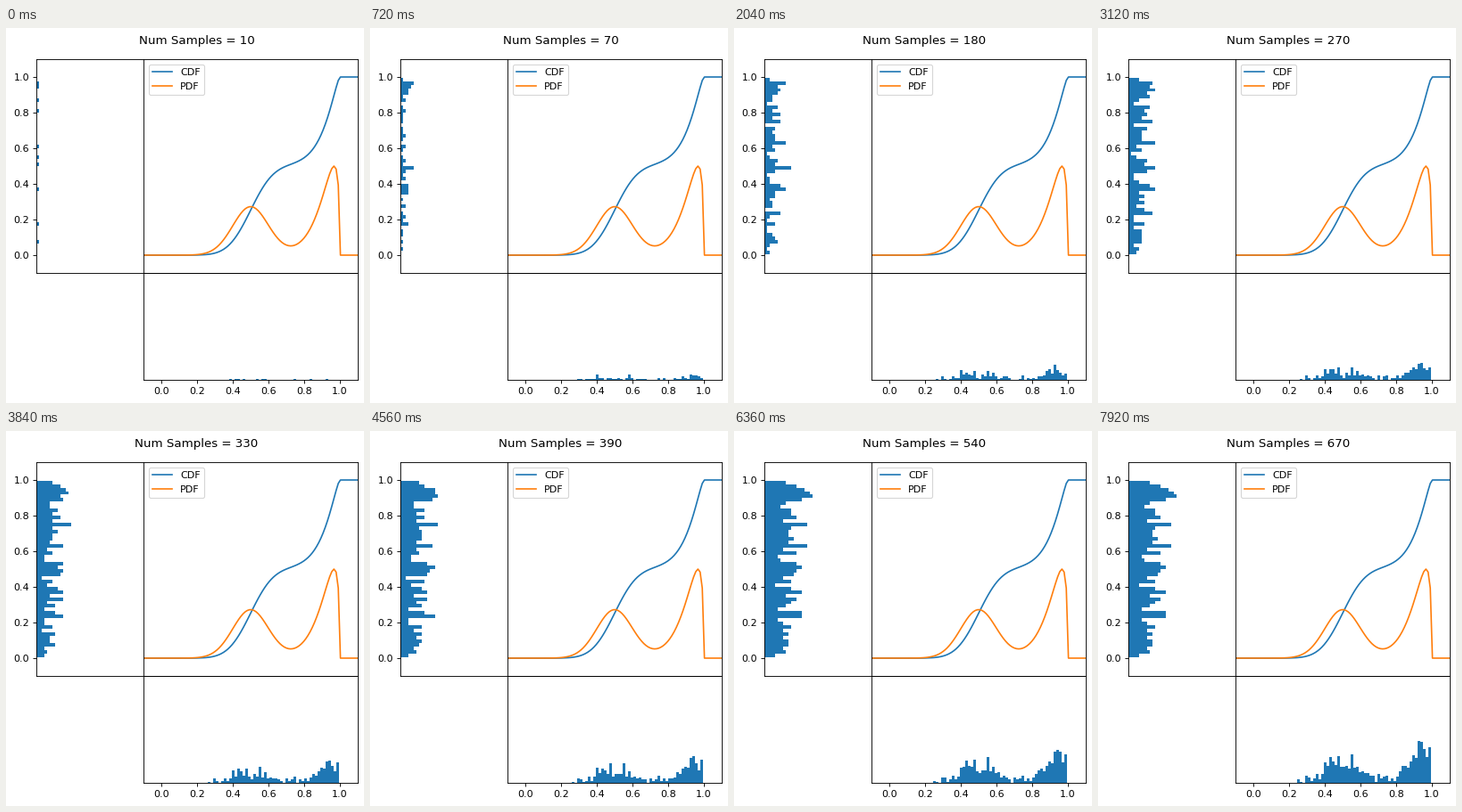
Recreate the animation shown at these times as a matplotlib script. Size 401 by 421 pixels, loop 8 s.

```python
import numpy as np
import matplotlib.pyplot as plt
from matplotlib.animation import FuncAnimation

W, H, DPI = 401, 421, 80
BLUE, ORANGE = "#1f77b4", "#ff7f0e"
TICK_MS, HOLD, LOOP_MS = 40, 3, 8000
BATCH, BINS = 10, 50
MAX_UNIFORM, MAX_MAPPED = 500, 670  # the uniform draws run out first
SPAN = (-0.1, 1.1)


def density(x):
    """Bell around 0.5 plus a skewed spike that falls to zero at 1."""
    bell = 0.272 * np.exp(-0.5 * ((x - 0.5) / 0.1) ** 2)
    rise, fall = 12.9, 0.43
    mode = rise / (rise + fall)
    t = np.clip(x, 0, 1)
    spike = 0.5 * (t / mode) ** rise * ((1 - t) / (1 - mode)) ** fall
    return np.where((x >= 0) & (x <= 1), bell + spike, 0)


def add_axes(x, y, w, h, xlim, ylim):
    """Axes placed by pixel, y measured from the top of the stage."""
    ax = fig.add_axes([x / W, 1 - (y + h) / H, w / W, h / H])
    ax.set(xlim=xlim, ylim=ylim, xticks=[], yticks=[])
    return ax


fine = np.linspace(*SPAN, 12001)
cdf = np.cumsum(density(fine))
cdf /= cdf[-1]

# Inverse transform sampling
rng = np.random.default_rng(4)
uniform = rng.random(MAX_UNIFORM)
mapped = np.interp(rng.random(MAX_MAPPED), cdf, fine)

fig = plt.figure(figsize=(W / DPI, H / DPI), dpi=DPI, facecolor="white")
side = add_axes(34, 35, 120, 240, (0, 40), SPAN)
base = add_axes(154, 275, 240, 120, SPAN, (0, 100))
main = add_axes(154, 35, 240, 240, SPAN, SPAN)
ticks = np.linspace(0, 1, 6)
side.set_yticks(ticks)
base.set_xticks(ticks)

grid = np.linspace(*SPAN, 100)
main.plot(grid, np.interp(grid, fine, cdf), color=BLUE, label="CDF")
main.plot(grid, density(grid), color=ORANGE, label="PDF")
main.legend(loc="upper left")

u_edges = np.linspace(0.005, 0.997, BINS + 1)
x_edges = np.linspace(0.245, 0.995, BINS + 1)
zeros = np.zeros(BINS)
u_bars = side.barh(u_edges[:-1], zeros, np.diff(u_edges), align="edge", color=BLUE)
x_bars = base.bar(x_edges[:-1], zeros, np.diff(x_edges), align="edge", color=BLUE)
side.set(xlim=(0, 40), ylim=SPAN)
base.set(xlim=SPAN, ylim=(0, 100))

title = fig.text(213.5 / W, 1 - 18 / H, "", size=12, ha="center", va="baseline")


def update(frame):
    n = BATCH * (frame // HOLD + 1)
    title.set_text(f"Num Samples = {n}")
    for bar, count in zip(u_bars, np.histogram(uniform[:n], u_edges)[0]):
        bar.set_width(count)
    for bar, count in zip(x_bars, np.histogram(mapped[:n], x_edges)[0]):
        bar.set_height(count)
    return [title, *u_bars, *x_bars]


anim = FuncAnimation(fig, update, frames=LOOP_MS // TICK_MS,
                     interval=TICK_MS, repeat=True, repeat_delay=0)
plt.show()
```
